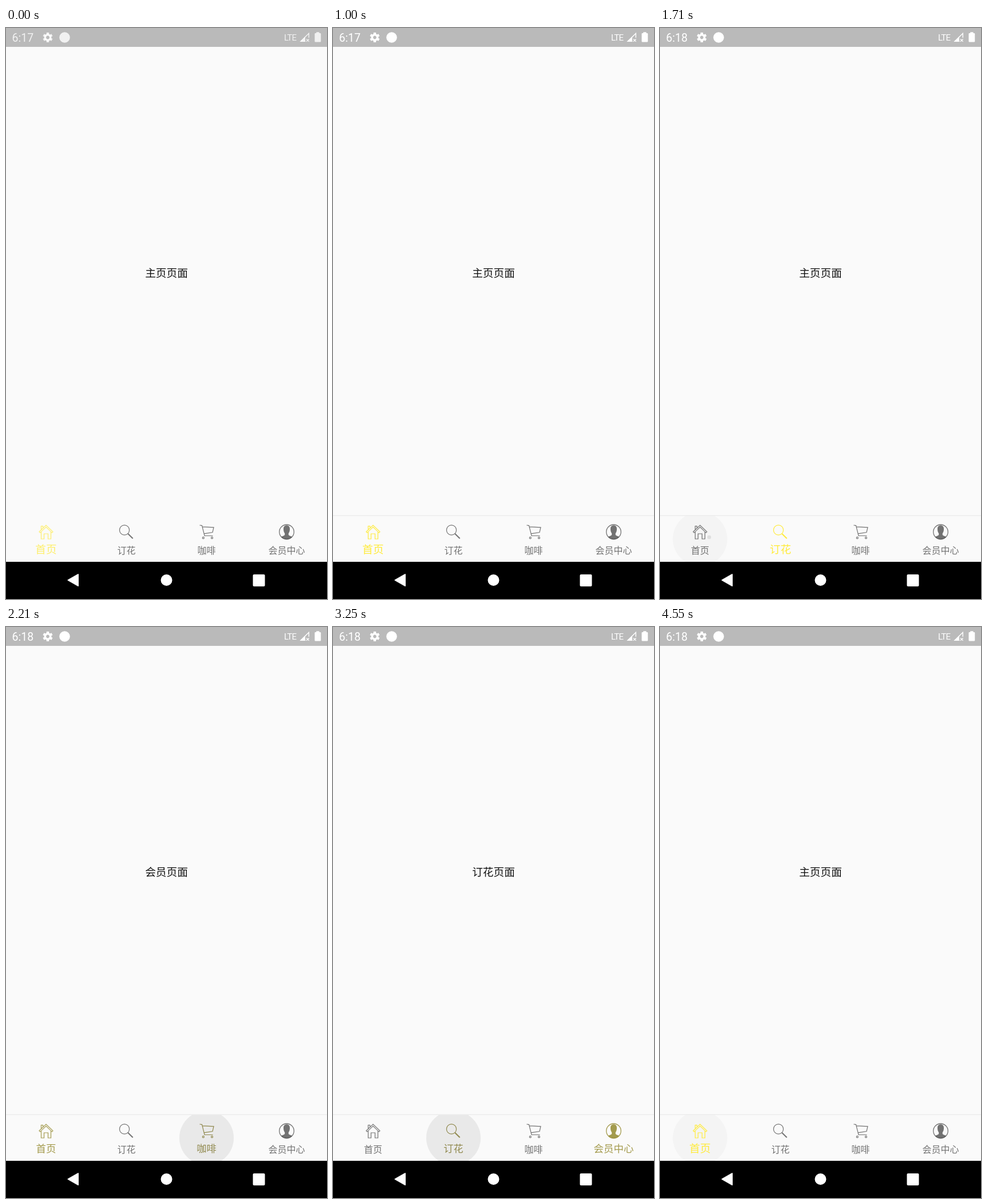
Animation of 561 by 998 pixels, one loop 4600 ms. Source, as an HTML page with a canvas:

```html
<!DOCTYPE html>
<html lang="zh-CN">
<head>
<meta charset="utf-8">
<title>Bottom navigation</title>
<style>
html, body { margin: 0; width: 100%; height: 100%; overflow: hidden; background: #fafafa; }
canvas { display: block; width: 561px; height: 998px; }
</style>
</head>
<body>
<canvas id="stage" width="561" height="998"></canvas>
<script>
const ctx = document.getElementById('stage').getContext('2d');
const LOOP = 4600, STEP = 1000 / 24;
const CJK = '"Noto Sans CJK SC", "Noto Sans CJK", sans-serif';
const BAR_TOP = 853, BAR_END = 933;

const tabs = [
  { x: 70, label: '首页', page: '主页页面', icon: drawHome },
  { x: 210.5, label: '订花', page: '订花页面', icon: drawSearch },
  { x: 350.5, label: '咖啡', page: '会员页面', icon: drawCart },
  { x: 490.5, label: '会员中心', page: '咖啡页面', icon: drawMember }
];

// Time of each tap, the tab it selects, and how long its highlight is held
const taps = [
  { at: 1210, tab: 1, hold: 130 },
  { at: 1710, tab: 0, hold: 130 },
  { at: 2144, tab: 2, hold: 130 },
  { at: 2660, tab: 3, hold: 130 },
  { at: 3184, tab: 1, hold: 130 },
  { at: 3840, tab: 0, hold: 450 }
];

const clamp = v => Math.max(0, Math.min(1, v));
const lerp = (a, b, p) => a + (b - a) * p;

// cubic-bezier(.4, 0, .2, 1)
function ease(x) {
  let lo = 0, hi = 1, u = x;
  for (let i = 0; i < 20; i++) {
    u = (lo + hi) / 2;
    const bx = 3 * (1 - u) * (1 - u) * u * 0.4 + 3 * (1 - u) * u * u * 0.2 + u * u * u;
    if (bx < x) lo = u; else hi = u;
  }
  return 3 * (1 - u) * u * u + u * u * u;
}

// Pictures advance at 24 per second on a 10 ms clock, with pauses near the end
function snap(t) {
  const start = k => Math.ceil((k * STEP - 1e-6) / 10) * 10;
  let k = Math.floor(t / STEP);
  if (start(k) > t) k--;
  const s = start(k);
  if (s >= 4550) return 4550;
  if (s >= 4340) return 4340;
  if (s > 4130 && s < 4300) return 4130;
  return s;
}

function tabColor(p) {
  const c = [255, 235, 59].map(v => Math.round(v * p));
  return `rgba(${c.join()},${lerp(0.54, 1, p)})`;
}

function circle(x, y, r) {
  ctx.beginPath();
  ctx.arc(x, y, r, 0, Math.PI * 2);
}

function line(d, width) {
  ctx.lineWidth = width;
  ctx.stroke(new Path2D(d));
}

function text(s, x, y, font, color, align = 'center') {
  ctx.font = font;
  ctx.fillStyle = color;
  ctx.textAlign = align;
  ctx.fillText(s, x, y);
}

function drawHome() {
  line('M58 880.5L70 869L82 880.5L80.5 882.3L70 872.3L59.5 882.3Z', 1.1);
  line('M61.5 881V893H66.5V884H73.5V893H78.5V881M61.5 876.5V870.5H64.5V873.5', 1.2);
}

function drawSearch() {
  circle(207, 877.5, 8.6);
  ctx.lineWidth = 1.2;
  ctx.stroke();
  line('M213.3 884L221.7 892.2', 2);
}

function drawCart() {
  line('M338.5 869L342.5 869.6L347 887.5H361.5M343.2 871.8L363 872.8L361 881.5L346 883.8', 1.2);
  for (const x of [344.8, 360]) {
    circle(x, 891.2, 1.5);
    ctx.stroke();
  }
}

function drawMember() {
  circle(490.5, 880.8, 12.8);
  ctx.lineWidth = 1.3;
  ctx.stroke();
  ctx.save();
  ctx.clip();
  ctx.fill(new Path2D('M490.5 869.3C494.5 869.3 496.3 872 496 876.5C496 880 494.6 882 493.8 883.3V886' +
    'C495.5 888 499 887.8 501 890V895H480V890C482 887.8 485.5 888 487.2 886V883.3' +
    'C486.4 882 485 880 485 876.5C484.7 872 486.5 869.3 490.5 869.3Z'));
  ctx.restore();
}

function drawGear(x, y) {
  ctx.save();
  ctx.translate(x, y);
  for (let i = 0; i < 6; i++) {
    ctx.fillRect(-2.2, -8.6, 4.4, 5);
    ctx.rotate(Math.PI / 3);
  }
  circle(0, 0, 4.7);
  ctx.lineWidth = 3.6;
  ctx.stroke();
  ctx.restore();
}

function drawStatus(t) {
  ctx.fillStyle = '#bababa';
  ctx.fillRect(0, 0, 561, 33);
  ctx.save();
  if (t < 50) ctx.globalAlpha = 0.8;
  ctx.strokeStyle = '#fff';
  text(t < 1300 ? '6:17' : '6:18', 10.5, 23.6, '19.5px Roboto, sans-serif', '#fff', 'left');
  drawGear(73, 16.5);
  circle(102.5, 16.5, 9.3);
  ctx.fill();
  ctx.letterSpacing = '-0.8px';
  text('LTE', 486, 22, '15px Roboto, sans-serif', '#fff', 'left');
  ctx.letterSpacing = '0px';
  line('M529.3 17V9.5L515 23.4H523.5', 1.4);
  ctx.fill(new Path2D('M514 24L523 15V24Z'));
  line('M525 19.2L529.6 23.8M529.6 19.2L525 23.8', 1.3);
  ctx.beginPath();
  ctx.roundRect(539.5, 9, 10.8, 15.5, 1.3);
  ctx.rect(542.3, 7.2, 5.2, 2);
  ctx.fill();
  ctx.restore();
}

function drawSystemBar() {
  ctx.fillStyle = '#000';
  ctx.fillRect(0, BAR_END, 561, 65);
  ctx.fillStyle = ctx.strokeStyle = '#fff';
  ctx.lineJoin = 'round';
  const back = 'M108.5 965L126 955V975Z';
  ctx.fill(new Path2D(back));
  line(back, 2);
  ctx.lineJoin = 'miter';
  circle(280.5, 965, 10);
  ctx.fill();
  ctx.beginPath();
  ctx.roundRect(431.5, 955, 21, 21, 2);
  ctx.fill();
}

function drawRipple(tap, t) {
  const rise = clamp((t - tap.at + 50) / 200);
  const fade = 1 - clamp((t - tap.at - tap.hold) / 330);
  if (!rise || !fade) return;
  const x = tabs[tap.tab].x, y = 893;
  ctx.save();
  ctx.beginPath();
  ctx.rect(0, BAR_TOP, 561, BAR_END - BAR_TOP);
  ctx.clip();
  circle(x, y, 47.5);
  ctx.fillStyle = `rgba(188,188,188,${0.4 * rise * fade})`;
  ctx.fill();
  if (t >= tap.at) {
    const p = clamp((t - tap.at) / 60);
    circle(lerp(x + 16, x, p), lerp(890, y, p), lerp(3.2, 47.5, p));
    ctx.fillStyle = `rgba(200,200,200,${lerp(0.5, 0.1, p) * fade})`;
    ctx.fill();
  }
  ctx.restore();
}

function drawTabs(t, current, previous, progress) {
  if (t >= 50) {
    ctx.fillStyle = '#f3f3f3';
    ctx.fillRect(0, 851, 561, 1);
    ctx.fillStyle = '#ececec';
    ctx.fillRect(0, 852, 561, 1);
  }
  for (const tap of taps) drawRipple(tap, t);
  tabs.forEach((tab, i) => {
    const p = i === current ? progress : i === previous ? 1 - progress : 0;
    const color = tabColor(p);
    ctx.save();
    if (t < 50 && i === 0) ctx.globalAlpha = 0.75;
    ctx.strokeStyle = ctx.fillStyle = color;
    tab.icon();
    text(tab.label, tab.x, lerp(918.6, 918, p), `${lerp(16, 18.67, p)}px ${CJK}`, color);
    ctx.restore();
  });
}

function draw(t) {
  let current = 0, previous = -1, since = -1000;
  for (const tap of taps) {
    if (t < tap.at) break;
    previous = current;
    current = tap.tab;
    since = tap.at;
  }
  ctx.fillStyle = '#fafafa';
  ctx.fillRect(0, 0, 561, 998);
  drawStatus(t);
  text(tabs[current].page, 280.5, 435, `18.7px ${CJK}`, '#111');
  drawTabs(t, current, previous, ease(clamp((t - since) / 200)));
  drawSystemBar();
}

const begin = performance.now();
function tick() {
  draw(snap((performance.now() - begin) % LOOP));
  requestAnimationFrame(tick);
}
tick();
</script>
</body>
</html>
```
